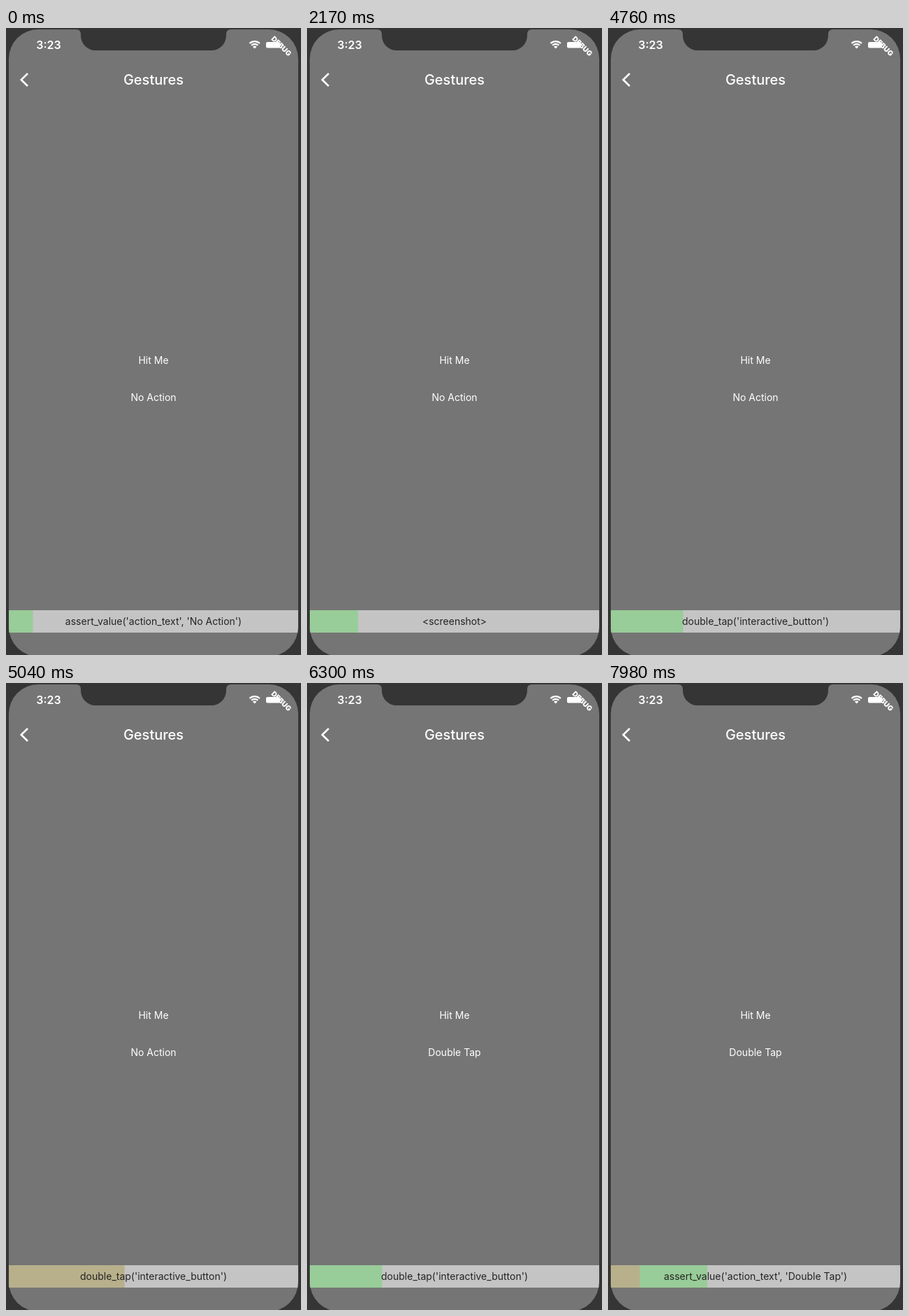
An HTML page with a canvas for the animation above (8 s loop, 422 by 896 pixels).

```html
<!DOCTYPE html>
<html lang="en">
<head>
<meta charset="utf-8">
<title>Gestures</title>
<style>
  html, body { margin: 0; width: 100%; height: 100%; overflow: hidden; background: #353535; }
  canvas { display: block; width: 422px; height: 896px; }
</style>
</head>
<body>
<canvas id="stage" width="422" height="896"></canvas>
<script>
const canvas = document.getElementById('stage');
const ctx = canvas.getContext('2d');
const LOOP = 8000, TICK = 70;
const FONT = 'Inter, Roboto, sans-serif';
const SCREEN = { x: 4, y: 2, w: 414, h: 896, r: 42 };
const BAR = { y: 832, h: 32 };
const MID = 211;
const STEP = SCREEN.w / 12;

// Test steps: caption and the time span in which it fades in.
const captions = [
  { text: "assert_value('action_text', 'No Action')", from: -2, to: -1 },
  { text: '<screenshot>', from: 1750, to: 2170 },
  { text: "double_tap('interactive_button')", from: 4060, to: 4410 },
  { text: "assert_value('action_text', 'Double Tap')", from: 7280, to: 7630 }
];
const advances = [[700, 910], [3080, 3290], [6300, 6510]];
const waits = [4820, 7910];
const WAIT_TIME = 500;
const TAP_TIME = 5600;

const ramp = (t, a, b) => Math.min(1, Math.max(0, (t - a) / (b - a)));

function label(text, x, y, size, weight, color, alpha = 1) {
  ctx.globalAlpha = alpha;
  ctx.font = `${weight} ${size}px ${FONT}`;
  ctx.textAlign = 'center';
  ctx.textBaseline = 'alphabetic';
  ctx.fillStyle = color;
  ctx.fillText(text, x, y);
  ctx.globalAlpha = 1;
}

function box(x, y, w, h, r, color) {
  ctx.fillStyle = color;
  ctx.beginPath();
  ctx.roundRect(x, y, w, h, r);
  ctx.fill();
}

function drawNotch() {
  ctx.fillStyle = '#353535';
  ctx.beginPath();
  ctx.moveTo(100, 0);
  ctx.lineTo(100, 2);
  ctx.quadraticCurveTo(107, 2, 107, 9);
  ctx.arcTo(107, 32, 130, 32, 21);
  ctx.arcTo(315, 32, 315, 9, 21);
  ctx.lineTo(315, 9);
  ctx.quadraticCurveTo(315, 2, 322, 2);
  ctx.lineTo(322, 0);
  ctx.fill();
}

function drawWifi() {
  const cx = 355.7, cy = 29.6, spread = 0.76, up = -Math.PI / 2;
  ctx.strokeStyle = ctx.fillStyle = '#fff';
  ctx.lineWidth = 2.3;
  for (const r of [10.5, 6.7]) {
    ctx.beginPath();
    ctx.arc(cx, cy, r, up - spread, up + spread);
    ctx.stroke();
  }
  ctx.beginPath();
  ctx.moveTo(cx, cy);
  ctx.arc(cx, cy, 4, up - spread, up + spread);
  ctx.fill();
}

function drawStatus() {
  label('3:23', 61, 30, 16, 600, '#fff');
  drawWifi();
  ctx.save();
  ctx.translate(394, 25.8);
  ctx.rotate(Math.PI / 4);
  label('DEBUG', 0, 3.7, 10.2, 900, '#fff');
  ctx.restore();
  box(372, 20, 20, 8.5, 2, '#fff');
}

function drawHeader() {
  ctx.strokeStyle = '#fff';
  ctx.lineWidth = 2.6;
  ctx.beginPath();
  ctx.moveTo(31, 65);
  ctx.lineTo(21.8, 74);
  ctx.lineTo(31, 83);
  ctx.stroke();
  label('Gestures', MID, 81, 20, 500, '#fff');
}

function drawBody(t) {
  label('Hit Me', MID, 480, 14, 400, '#fff');
  label(t < TAP_TIME ? 'No Action' : 'Double Tap', MID, 533, 14, 400, '#fff');
  const flash = ramp(t, 5110, 5320) * (1 - ramp(t, 5320, 5600));
  if (flash > 0) box(169, 447, 84, 56, 4, `rgba(255, 241, 124, ${0.41 * flash})`);
}

function drawBar(t) {
  const { x, w } = SCREEN;
  ctx.fillStyle = '#c4c4c4';
  ctx.fillRect(x, BAR.y, w, BAR.h);

  const done = advances.reduce((n, [a, b]) => n + ramp(t, a, b), 1);
  ctx.fillStyle = '#98cc98';
  ctx.fillRect(x, BAR.y, done * STEP, BAR.h);

  // The wait indicator grows in tenths, then vanishes.
  for (const start of waits) {
    const p = (t - start) / WAIT_TIME;
    if (p > 0 && p < 1) {
      ctx.fillStyle = '#b8b08b';
      ctx.fillRect(x, BAR.y, Math.floor(p * 10) / 10 * w, BAR.h);
    }
  }

  captions.forEach((c, i) => {
    const next = captions[i + 1];
    const alpha = ramp(t, c.from, c.to) * (next ? 1 - ramp(t, next.from, next.to) : 1);
    if (alpha > 0) label(c.text, MID, 853, 14, 400, '#242424', alpha);
  });
}

function draw(t) {
  ctx.fillStyle = '#353535';
  ctx.fillRect(0, 0, 422, 896);
  ctx.save();
  ctx.beginPath();
  ctx.roundRect(SCREEN.x, SCREEN.y, SCREEN.w, SCREEN.h, SCREEN.r);
  ctx.clip();
  ctx.fillStyle = '#757575';
  ctx.fillRect(0, 0, 422, 896);
  drawHeader();
  drawBody(t);
  drawBar(t);
  drawStatus();
  ctx.restore();
  drawNotch();
}

const begin = performance.now();
function loop() {
  const t = (performance.now() - begin) % LOOP;
  draw(Math.floor(t / TICK) * TICK);
  requestAnimationFrame(loop);
}
loop();
</script>
</body>
</html>
```
